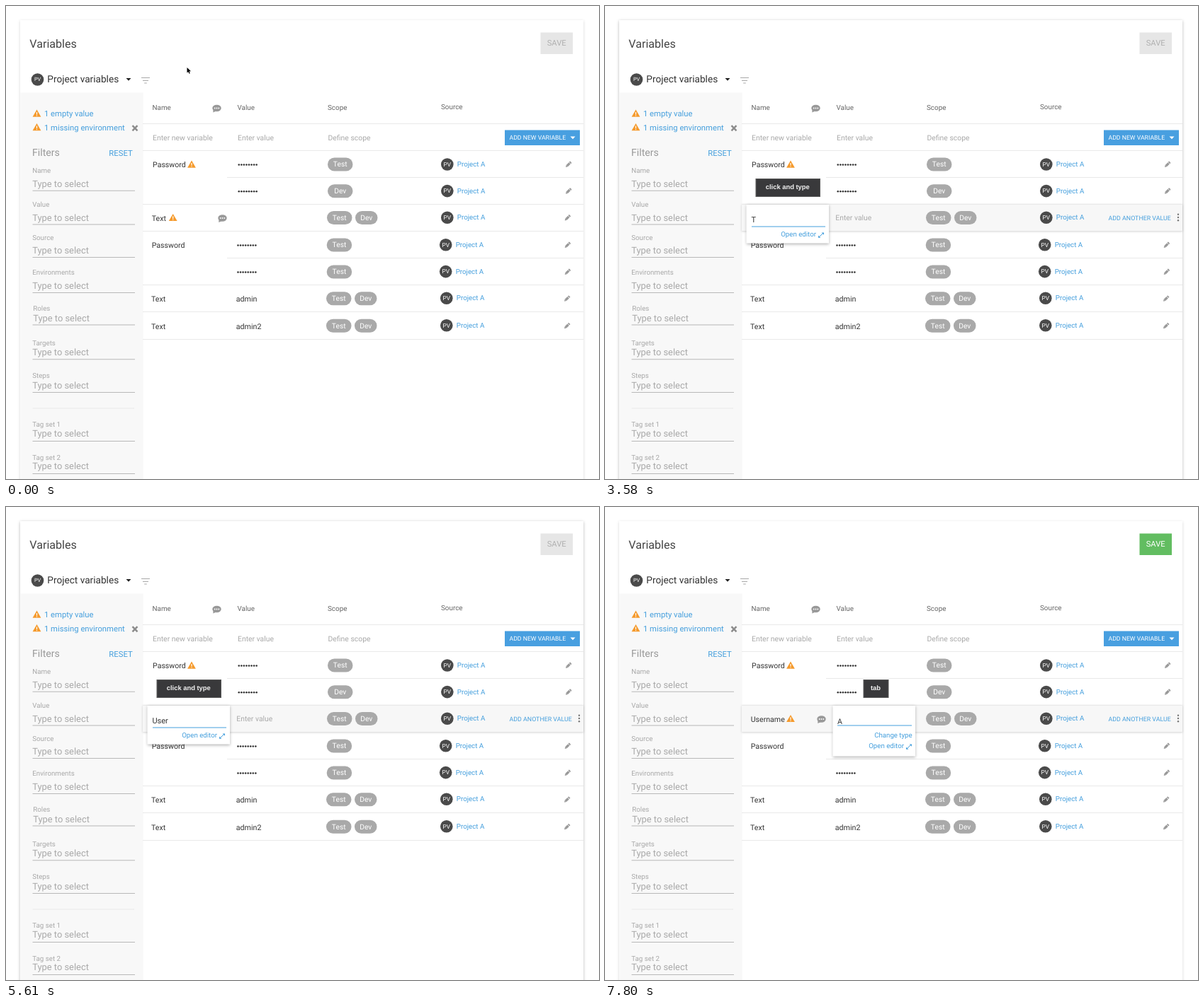
An HTML page with a canvas that plays this animation: 837 px wide and 669 px high, repeating every 8000 ms.

```html
<!DOCTYPE html>
<html lang="en">
<head>
<meta charset="utf-8">
<title>Variables editor</title>
<style>
html, body { margin: 0; width: 100%; height: 100%; overflow: hidden; background: #fff; }
canvas { display: block; }
</style>
</head>
<body>
<canvas id="stage" width="837" height="669"></canvas>
<script>
const ctx = document.getElementById('stage').getContext('2d');
ctx.textRendering = 'geometricPrecision';

const LOOP = 8000;
const HOVER = 1050, CLICK = 1870, TAB = 7410;
const BLUE = '#459fdd', DARK = '#333', GREY = '#999', HINT = '#a9a9a9', LINE = '#e9e9e9';

// [start time, value]; each value holds until the next one
const POINTER = [[0, [255.5, 87]], [420, [245.5, 141]], [640, [235.5, 195.5]],
  [850, [224.5, 258.5]], [1050, [217, 295]], [2060, null]];
const NAME = [[0, 'Text'], [2450, 'Tex'], [3200, 'Te'], [3580, 'T'], [4310, ''], [4670, 'U'], [5240, 'Us'],
  [5430, 'Use'], [5610, 'User'], [6000, 'Usern'], [6400, 'Userna'], [6600, 'Usernam'], [6990, 'Username']];
const VALUE = [[0, ''], [7800, 'A']];
const at = (steps, t) => steps.findLast(step => step[0] <= t)[1];

// cy is the optical middle of the line, slightly below the centre of the capitals
function text(str, x, cy, size, color = DARK, align = 'left', font = 'Roboto, sans-serif') {
  ctx.font = `${size}px ${font}`;
  ctx.textAlign = align;
  ctx.fillStyle = color;
  ctx.fillText(str, x, cy + size * 0.315);
}

function box(x, y, w, h, color, radius = 0) {
  ctx.fillStyle = color;
  ctx.beginPath();
  ctx.roundRect(x, y, w, h, radius);
  ctx.fill();
}

function shadowBox(x, y, w, h, color, alpha, blur = 4, dy = 1) {
  ctx.save();
  ctx.shadowColor = `rgba(0,0,0,${alpha})`;
  ctx.shadowBlur = blur;
  ctx.shadowOffsetY = dy;
  box(x, y, w, h, color);
  ctx.restore();
}

const rule = (x1, x2, y, color = LINE) => box(x1, y, x2 - x1, 1, color);

function disc(x, y, r, color) {
  ctx.fillStyle = color;
  ctx.beginPath();
  ctx.arc(x, y, r, 0, 7);
  ctx.fill();
}

function poly(points, color) {
  ctx.fillStyle = color;
  ctx.beginPath();
  points.forEach(([x, y]) => ctx.lineTo(x, y));
  ctx.closePath();
  ctx.fill();
}

function stroke(d, color, width) {
  ctx.strokeStyle = color;
  ctx.lineWidth = width;
  ctx.stroke(new Path2D(d));
}

const caret = (x, y, color) => poly([[x - 3.5, y - 1.7], [x + 3.5, y - 1.7], [x, y + 2]], color);

function badge(x, y, size) {
  disc(x, y, 8.8, '#4a4a4a');
  text('PV', x, y + 0.2, size, '#fff', 'center');
}

function warning(x, y) {
  poly([[x, y - 5.4], [x + 5.9, y + 4.8], [x - 5.9, y + 4.8]], '#f59a2c');
  box(x - 0.6, y - 2, 1.2, 3.6, '#fff');
  box(x - 0.6, y + 2.4, 1.2, 1.2, '#fff');
}

function comment(x, y) {
  ctx.fillStyle = GREY;
  ctx.beginPath();
  ctx.ellipse(x, y - 0.5, 6.2, 4.8, 0, 0, 7);
  ctx.fill();
  poly([[x - 5, y + 1], [x - 5.2, y + 5.4], [x - 0.5, y + 3.5]], GREY);
  for (const dx of [-2.8, 0, 2.8]) disc(x + dx, y - 0.5, 0.9, '#fff');
}

function pencil(x, y, color) {
  ctx.save();
  ctx.translate(x, y);
  ctx.rotate(-Math.PI / 4);
  box(-3, -1.7, 5.3, 3.4, color);
  box(2.9, -1.7, 1.9, 3.4, color, 0.6);
  poly([[-3, -1.7], [-3, 1.7], [-5.6, 0]], color);
  ctx.restore();
}

function openEditor(right, y) {
  text('Open editor', right, y, 9.7, BLUE, 'right');
  const x = right + 7;
  stroke(`M${x - 3} ${y + 4}L${x + 3} ${y - 2}`, BLUE, 1);
  poly([[x + 0.6, y - 2.6], [x + 4, y - 2.6], [x + 4, y + 0.8]], BLUE);
  poly([[x - 0.6, y + 4.8], [x - 4, y + 4.8], [x - 4, y + 1.4]], BLUE);
}

function tooltip(label, x, y, w) {
  box(x, y, w, 26, '#5a5a5a');
  box(x + 1, y + 1, w - 2, 24, '#39393b');
  ctx.font = 'bold 9.4px "Liberation Sans", sans-serif';
  ctx.textAlign = 'center';
  ctx.fillStyle = '#f2f2f2';
  ctx.fillText(label, x + (w - 1) / 2, y + 15.3);
}

function pill(label, x, y, w) {
  box(x, y - 9.5, w, 19, '#a9a9a9', 9.5);
  text(label, x + w / 2, y, 10.3, '#fff', 'center');
}

function secret(x, y) {
  for (let i = 0; i < 8; i++) disc(x + 1.8 + i * 3.55, y, 1.3, DARK);
}

function header(saved) {
  text('Variables', 33.3, 54, 16.1, '#444');
  box(754.5, 37.5, 45.5, 30.5, saved ? '#62bd61' : '#e6e6e6');
  text('SAVE', 777.2, 52.3, 11.2, saved ? '#fff' : '#b0b0b0', 'center');
  badge(44.5, 104, 7.3);
  text('Project variables', 58.3, 103.7, 13.65);
  caret(173, 103.8, '#222');
  [[6, 101], [4, 105], [1.8, 108.5]].forEach(([half, y]) => rule(197 - half, 197 + half, y, HINT));
}

function sidebar() {
  box(20.5, 122.5, 173, 547, '#f8f8f8');
  warning(43.5, 152);
  text('1 empty value', 54, 152.5, 11.25, BLUE);
  warning(43.5, 171.5);
  text('1 missing environment', 54, 172.6, 11.25, BLUE);
  stroke('M178.5 169.2L185.5 176.4M185.5 169.2L178.5 176.4', '#8c8c8c', 2.5);
  text('Filters', 37, 207.7, 14.1, GREY);
  text('RESET', 145.3, 208, 11.3, BLUE);
  const fields = [['Name', 232.5, 251.5, 260.8], ['Value', 281, 299.6, 308.5], ['Source', 327.5, 346, 355],
    ['Environments', 377.3, 396, 405], ['Roles', 427.5, 442.2, 450.5], ['Targets', 476.5, 490, 499.3],
    ['Steps', 523, 537.2, 546], ['Tag set 1', 592, 605.2, 615], ['Tag set 2', 638.5, 651.2, 661]];
  for (const [label, labelY, inputY, lineY] of fields) {
    const dx = label === 'Roles' ? 1 : 0;
    text(label, 37.2 + dx, labelY, 9.75, HINT);
    text('Type to select', 37.2 + dx, inputY, 12.9, HINT);
    rule(37.5, 182, lineY, '#b8b8b8');
  }
  rule(37.5, 181, 568.5, LINE);
}

function tableHead() {
  [['Name', 206.5, 144], ['Value', 326.5, 144], ['Scope', 454, 144], ['Source', 614, 143.3]]
    .forEach(([label, x, y]) => text(label, x, y, 9.9, '#666'));
  comment(297.5, 145);
  rule(193, 815, 166);
  text('Enter new variable', 207, 186.5, 10.45, HINT);
  text('Enter value', 327, 186.5, 10.4, HINT);
  text('Define scope', 454.5, 186.5, 10.4, HINT);
  box(704, 175.5, 106, 21.5, '#489fe0');
  text('ADD NEW VARIABLE', 710.5, 186.3, 8.7, '#fff');
  caret(800, 186.3, '#fff');
}

const ROWS = [
  { name: 'Password', y: 224, dx: 2, tags: 1, secret: true, warn: true },
  { y: 261.7, dx: 2, tags: 1, secret: true, only: 'Dev' },
  { y: 299.5, dx: 1, tags: 2, active: true },
  { name: 'Password', y: 338, dx: 0.7, tags: 1, secret: true },
  { y: 376, dx: 0.7, tags: 1, secret: true },
  { name: 'Text', y: 413.8, dx: 0, tags: 2, value: 'admin' },
  { name: 'Text', y: 452.3, dx: 0, tags: 2, value: 'admin2' },
];

function activeRow(t) {
  if (t >= CLICK) shadowBox(193, 280.5, 622, 38, '#f7f7f7', 0.18, 3, 0.5);
  else if (t >= HOVER) box(193, 281, 622, 37, '#f6fbfa');
  const named = t >= TAB;
  text(named ? 'Username' : 'Text', 205.7, 300.3, 10.6);
  warning(named ? 262 : 235.7, 299.3);
  comment(305.5, 300.5);
  if (t >= HOVER) {
    text('Enter value', 325.3, 299.8, 10.4, HINT);
    for (const y of [294.7, 299, 303.3]) disc(809, y, 1.2, '#777');
  }
  if (t >= CLICK) text('ADD ANOTHER VALUE', 710.5, 299.8, 8.85, BLUE);
  else pencil(792.7, 299.5, t >= HOVER ? BLUE : GREY);
}

function tableRow(row, i, t) {
  const { y, dx } = row;
  if (row.active) activeRow(t);
  else {
    if (row.name) text(row.name, 205 + dx, y + 0.9, 10.6);
    if (row.warn) warning(262, y);
    if (row.secret) secret(325 + dx, y + 0.5);
    if (row.value) text(row.value, 324.7, y + 0.9, 10.7);
    pencil(792 + dx, y, GREY);
  }
  const pillX = 452 + dx;
  pill(row.only || 'Test', pillX, y, 35.5);
  if (row.tags === 2) pill('Dev', pillX + 40, y, 31.5);
  const sourceX = i < 3 ? 622.8 : i < 5 ? 620.7 : 621.8;
  const sourceY = y - i * 0.1;
  badge(sourceX, sourceY, 8.3);
  text('Project A', sourceX + 14, sourceY, 9.75, BLUE);
}

function table(t) {
  tableHead();
  [204, 242, 280, 318, 356, 394, 432, 471].forEach((y, i) => rule(i === 1 || i === 4 ? 312 : 193, 815, y));
  ROWS.forEach((row, i) => tableRow(row, i, t));
}

function popups(t) {
  if (t >= TAB) {
    shadowBox(321.5, 281, 116.5, 71.5, '#fff', 0.3);
    text(at(VALUE, t), 328, 303.2, 10.7);
    rule(328, 433, 308.5, BLUE);
    text('Change type', 433.7, 323, 9.7, BLUE, 'right');
    openEditor(422, 338);
    tooltip('tab', 364.5, 244, 36);
  } else if (t >= CLICK) {
    shadowBox(199.5, 281, 116.5, 54.5, '#fff', 0.3);
    text(at(NAME, t), 206.4, 303, 11);
    rule(207, 311, 311.5, BLUE);
    openEditor(298, 323);
    tooltip('click and type', 212.5, 244, 91.5);
  } else if (t >= HOVER) tooltip('hover', 210.5, 248.5, 37.5);
}

function pointer(t) {
  const tip = at(POINTER, t);
  if (!tip) return;
  const [x, y] = tip;
  const arrow = [[0, 0], [0, 7.6], [1.8, 6], [3, 8.8], [4.3, 8.2], [3.1, 5.5], [5.5, 5.3]]
    .map(([dx, dy]) => [x + dx, y + dy]);
  stroke('M' + arrow.join('L') + 'Z', '#fff', 1.2);
  poly(arrow, '#000');
}

function draw(now) {
  const t = now % LOOP;
  box(0, 0, 837, 669, '#fff');
  shadowBox(20, 20, 795, 680, '#fff', t >= HOVER && t < TAB ? 0.28 : 0.16);
  header(t >= TAB);
  sidebar();
  table(t);
  popups(t);
  pointer(t);
}

const start = performance.now();
function frame() {
  draw(performance.now() - start);
  requestAnimationFrame(frame);
}
frame();
</script>
</body>
</html>
```
